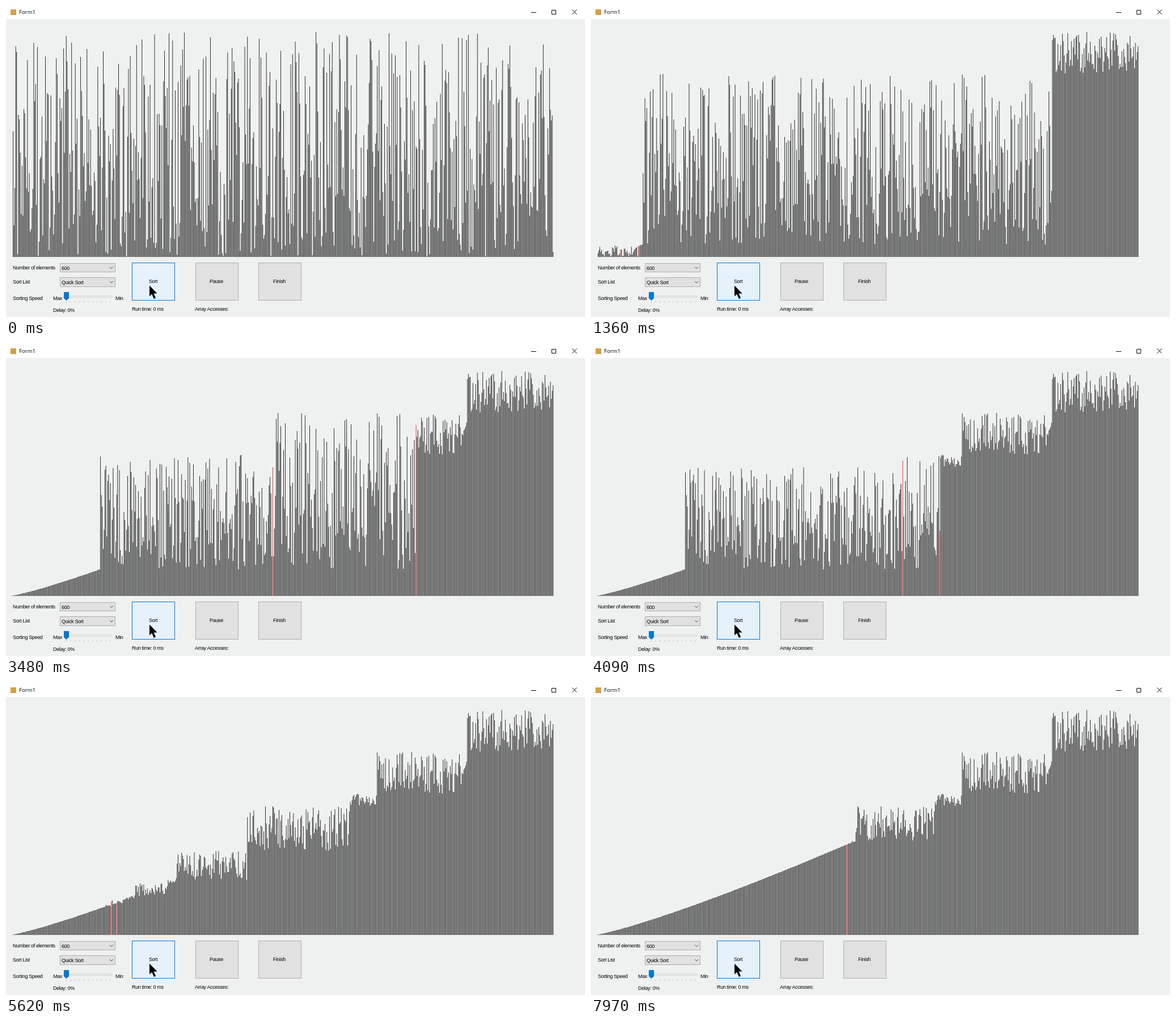
Recreate the animation shown at these times as an HTML page with a canvas. Size 1021x549 px, loop 8000 ms.

```html
<!DOCTYPE html>
<html lang="en">
<head>
<meta charset="utf-8">
<title>Form1</title>
<style>
  html, body { margin: 0; width: 100%; height: 100%; overflow: hidden; background: #eff0f0; }
  svg, canvas { position: absolute; left: 0; top: 0; }
  text { font: 9px "Liberation Sans", Arial, sans-serif; letter-spacing: -.35px; fill: #000; }
  .title { font: 9.6px "Open Sans", sans-serif; letter-spacing: 0; }
  .mid { text-anchor: middle; }
  .box { fill: #e1e1e1; stroke: #adadad; }
  .focus { fill: #e5f1fb; stroke: #0078d7; }
  .line { fill: none; stroke: #000; }
</style>
</head>
<body>
<svg width="1021" height="549">
  <rect width="1021" height="23" fill="#fff"/>
  <rect x="8" y="6" width="10" height="10" fill="#d2a04c"/>
  <text class="title" x="23" y="14">Form1</text>
  <path class="line" d="M926 11.5h9M962.5 7.5h7v7h-7zM998.5 6.5l8 8m0-8l-8 8"/>

  <text x="12" y="465">Number of elements</text>
  <text x="12" y="490">Sort List</text>
  <text x="12" y="519">Sorting Speed</text>
  <rect class="box" x="95.5" y="454.5" width="97" height="15"/>
  <rect class="box" x="95.5" y="479.5" width="97" height="16"/>
  <text x="98" y="465.5">600</text>
  <text x="98" y="491">Quick Sort</text>
  <path class="line" stroke-opacity=".7" d="M183 460.5l3 3 3-3M183 486l3 3 3-3"/>

  <text x="83" y="519">Max</text>
  <text x="193" y="519">Min</text>
  <text x="83" y="540">Delay: 0%</text>
  <rect x="101.5" y="511.5" width="85" height="3" fill="#e7eaea" stroke="#d6d6d6"/>
  <path d="M106 522.5h78" stroke="#c4c4c4" stroke-width="3" stroke-dasharray="1 6.7"/>
  <path d="M102 505h9v11l-4.5 4-4.5-4z" fill="#0078d7"/>

  <rect class="focus" x="222.5" y="453.5" width="75" height="66"/>
  <rect class="box" x="334.5" y="453.5" width="75" height="66"/>
  <rect class="box" x="445.5" y="453.5" width="75" height="66"/>
  <text class="mid" x="259.5" y="489">Sort</text>
  <text class="mid" x="371" y="489">Pause</text>
  <text class="mid" x="482" y="489">Finish</text>
  <text x="222" y="538">Run time: 0 ms</text>
  <text x="333" y="538">Array Accesses:</text>
  <path d="M253 493.5v19l4.3-3.8 3.6 8.3 3.2-1.4-3.6-8h6z"/>
</svg>
<canvas id="chart" width="1021" height="549"></canvas>
<script>
const COUNT = 600, LEFT = 12, BASE = 443, PITCH = 1.59, BAR = 0.8;
const LOOP = 8000, TICK = 46.3;
const ctx = document.getElementById('chart').getContext('2d');

// Pivot rank of each large partition, and when that partition starts (ms)
const partitions = [
  [504, 0], [50, 728], [97, 1770], [404, 3075], [374, 3730],
  [260, 4130], [181, 4620], [203, 6390], [286, 7500]
];

let seed = 4711;
const random = () => (seed = seed * 16807 % 2147483647) / 2147483647;
const swap = (a, i, j) => { [a[i], a[j]] = [a[j], a[i]]; };
const height = rank => Math.round(1 + 396 * (rank / (COUNT - 1)) ** 1.18);

// The list holds ranks, shuffled
const initial = Array.from({ length: COUNT }, (_, rank) => rank);
for (let i = COUNT - 1; i > 0; i--) swap(initial, i, Math.floor(random() * (i + 1)));

const work = initial.slice();
const ops = [], marks = [];

// Each range [lo, hi) holds exactly the ranks lo to hi - 1
function quickSort(lo, hi) {
  if (hi - lo < 2) return;
  const planned = partitions.find(([rank]) => rank > lo && rank < hi);
  if (planned) marks.push({ time: planned[1], op: ops.length });
  const pivot = planned ? planned[0] : Math.max(lo + 1, work[(lo + hi) >> 1]);
  let i = lo, j = hi - 1;
  while (true) {
    while (work[i] < pivot) ops.push([++i, j, false]);
    while (work[j] >= pivot) ops.push([i, --j, false]);
    if (i > j) break;
    swap(work, i, j);
    ops.push([i, j, true]);
  }
  quickSort(lo, pivot);
  quickSort(pivot, hi);
}
quickSort(0, COUNT);

// Steps done by a given time, at an even pace between marks
function opsAt(time) {
  let k = 1;
  while (k < marks.length - 1 && marks[k].time < time) k++;
  const from = marks[k - 1], to = marks[k];
  return Math.floor(from.op + (to.op - from.op) * (time - from.time) / (to.time - from.time));
}

function draw(time) {
  const done = ops.slice(0, opsAt(time));
  const list = initial.slice();
  for (const [i, j, swapped] of done) if (swapped) swap(list, i, j);
  const [left, right] = done.at(-1) ?? [];
  ctx.clearRect(0, 0, 1021, 549);
  list.forEach((rank, i) => {
    const h = height(rank);
    ctx.fillStyle = i === left || i === right ? '#f00' : '#000';
    ctx.fillRect(LEFT + i * PITCH, BASE - h, BAR, h);
  });
}

let shown = -1;
function frame() {
  const tick = Math.floor(performance.now() % LOOP / TICK);
  if (tick !== shown) draw((shown = tick) * TICK);
  requestAnimationFrame(frame);
}
frame();
</script>
</body>
</html>
```
